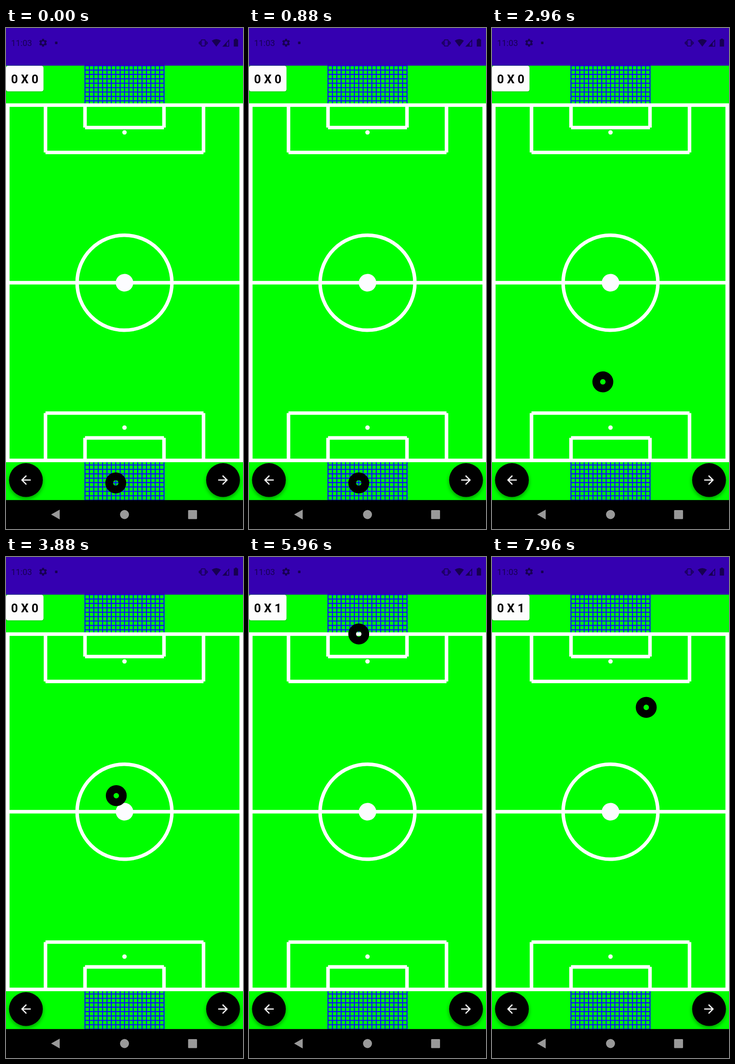
Recreate the animation shown at these times as an HTML page. Size 515 px wide and 1087 px high, loop 8 s.

```html
<!DOCTYPE html>
<html lang="en">
<head>
<meta charset="utf-8">
<title>Football pitch</title>
<style>
  html, body { margin: 0; width: 100%; height: 100%; overflow: hidden; background: #000; }
  svg { display: block; width: 100vw; height: 100vh; }
  text { font-family: Roboto, Arial, sans-serif; }
  .lines { fill: none; stroke: #fff; stroke-width: 7.7; }
  .net { fill: none; stroke: #0a14f5; stroke-width: 2.4; }
  .fab { filter: drop-shadow(0 4px 4px rgba(0, 0, 0, .4)); }
  .card { filter: drop-shadow(0 1px 1px rgba(0, 0, 0, .25)); }
</style>
</head>
<body>
<svg viewBox="0 0 515 1087">
  <rect width="515" height="1087" fill="#0f0"/>

  <path id="netTop" class="net"/>
  <path id="netBottom" class="net"/>

  <g class="lines">
    <rect x="3.9" y="167.3" width="507.2" height="770.9"/>
    <path d="M0 552.7H515"/>
    <circle cx="257.5" cy="552.7" r="103"/>
    <path d="M85.8 167V270M429.2 167V270M85.8 270H429.2"/>
    <path d="M171.7 167V216M343.3 167V216M171.7 216H343.3"/>
    <path d="M85.8 938V835.5M429.2 938V835.5M85.8 835.5H429.2"/>
    <path d="M171.7 938V889.3M343.3 938V889.3M171.7 889.3H343.3"/>
  </g>
  <g fill="#fff">
    <circle cx="257.5" cy="226.5" r="4.8"/>
    <circle cx="257.5" cy="867" r="4.8"/>
    <circle cx="257.5" cy="552.7" r="19.1" fill="#fcfcff"/>
  </g>

  <circle id="ball" r="14.3" fill="none" stroke="#000" stroke-width="16.8"/>

  <rect class="card" y="82" width="81.5" height="55.5" rx="4.5" fill="#fdfdfd"/>
  <text id="score" x="11" y="120" font-size="26" font-weight="700">0 X 0</text>

  <g class="fab">
    <circle cx="43.3" cy="980.8" r="36.7"/>
    <circle cx="471.6" cy="980.8" r="36.7"/>
  </g>
  <defs>
    <path id="arrow" d="M20 11H7.83l5.59-5.59L12 4l-8 8 8 8 1.41-1.41L7.83 13H20z" fill="#fff"/>
  </defs>
  <use href="#arrow" transform="translate(43.3 980.8) scale(1.31) translate(-12 -12)"/>
  <use href="#arrow" transform="translate(471.6 980.8) scale(-1.31 1.31) translate(-12 -12)"/>

  <!-- status bar -->
  <rect width="515" height="81.7" fill="#3500b1"/>
  <g fill="#170052">
    <text x="11" y="39.3" font-size="18.3">11:03</text>
    <path transform="translate(80.5 32) scale(.88) translate(-12 -12)" fill-rule="evenodd"
      d="M19.14 12.94c.04-.3.06-.61.06-.94s-.02-.64-.07-.94l2.03-1.58a.49.49 0 0 0 .12-.61l-1.92-3.32a.49.49 0 0 0-.59-.22l-2.39.96a7 7 0 0 0-1.62-.94L14.4 2.81a.48.48 0 0 0-.48-.41h-3.84a.47.47 0 0 0-.47.41l-.36 2.54a7.1 7.1 0 0 0-1.62.94l-2.39-.96a.47.47 0 0 0-.59.22L2.74 8.87a.47.47 0 0 0 .12.61l2.03 1.58a6 6 0 0 0 0 1.88l-2.03 1.58a.49.49 0 0 0-.12.61l1.92 3.32c.12.22.37.29.59.22l2.39-.96c.5.38 1.03.7 1.62.94l.36 2.54c.05.24.24.41.48.41h3.84c.24 0 .44-.17.47-.41l.36-2.54a7.1 7.1 0 0 0 1.62-.94l2.39.96c.22.08.47 0 .59-.22l1.92-3.32a.47.47 0 0 0-.12-.61zM12 15.6a3.6 3.6 0 1 1 0-7.2 3.6 3.6 0 0 1 0 7.2z"/>
    <rect x="106.5" y="29.5" width="5.4" height="5.4" rx="1"/>
    <path d="M447 27.5Q457 20.5 467 27.5L457 40.5z"/>
    <path d="M470 40.5L485 24.5V40.5zM479.5 33V38.8H483.3V28.8z" fill-rule="evenodd"/>
    <path d="M497.5 24.8V23H501.7V24.8H504.3V40.3H494.9V24.8z"/>
  </g>
  <g fill="none" stroke="#170052" stroke-width="1.7">
    <rect x="424.4" y="25.6" width="8.4" height="13.6" rx="1"/>
    <path d="M422 28V37M435.2 28V37M419.7 30V35M437.5 30V35"/>
  </g>

  <!-- navigation bar -->
  <rect y="1024.2" width="515" height="63" fill="#000"/>
  <g fill="#999">
    <path d="M98 1055.6L116.7 1045V1066.2z"/>
    <circle cx="257.5" cy="1055.6" r="9.8"/>
    <rect x="395.7" y="1046" width="19.4" height="19.4" rx="1.5"/>
  </g>
</svg>

<script>
const LOOP = 8000, GOAL = 5500, CELL = 515 / 54;
const $ = id => document.getElementById(id);
const ball = $('ball'), score = $('score');

// Grid lines are spaced from the outer edge towards the pitch.
function drawNet(el, top, bottom, edge, dir) {
  let d = '';
  for (let i = 0; i <= 18; i++) d += `M${171.7 + i * CELL} ${top}V${bottom}`;
  for (let i = 0; i <= 8; i++) d += `M170.5 ${edge + dir * i * CELL}H344.5`;
  el.setAttribute('d', d);
}
drawNet($('netTop'), 81, 164, 81.7, 1);
drawNet($('netBottom'), 942, 1025, 1024.4, -1);

// time, x, y, easing power towards the next step
const path = [
  [0, 238.5, 987, 1],
  [1900, 238.5, 987, 1.5],
  [2040, 242, 981, 1.12],
  [3880, 239.5, 518, 1],
  [5080, 376.5, 288.5, 1.1],
  [GOAL, 305, 167, 1],
  [GOAL, 238.5, 167, 1],
  [7300, 238.5, 167, 1.4],
  [7960, 335, 326, 1],
  [LOOP, 341, 336, 1]
];

function place(t) {
  let i = path.length - 2;
  while (i > 0 && path[i][0] > t) i--;
  const [t0, x0, y0, power] = path[i], [t1, x1, y1] = path[i + 1];
  const k = Math.pow((t - t0) / (t1 - t0), power);
  return [x0 + (x1 - x0) * k, y0 + (y1 - y0) * k];
}

const start = performance.now();
function draw(now) {
  const t = Math.max(0, now - start) % LOOP;
  const [x, y] = place(t);
  ball.setAttribute('cx', x);
  ball.setAttribute('cy', y);
  const label = t < GOAL ? '0 X 0' : '0 X 1';
  if (score.textContent !== label) score.textContent = label;
  requestAnimationFrame(draw);
}
draw(start);
</script>
</body>
</html>
```
